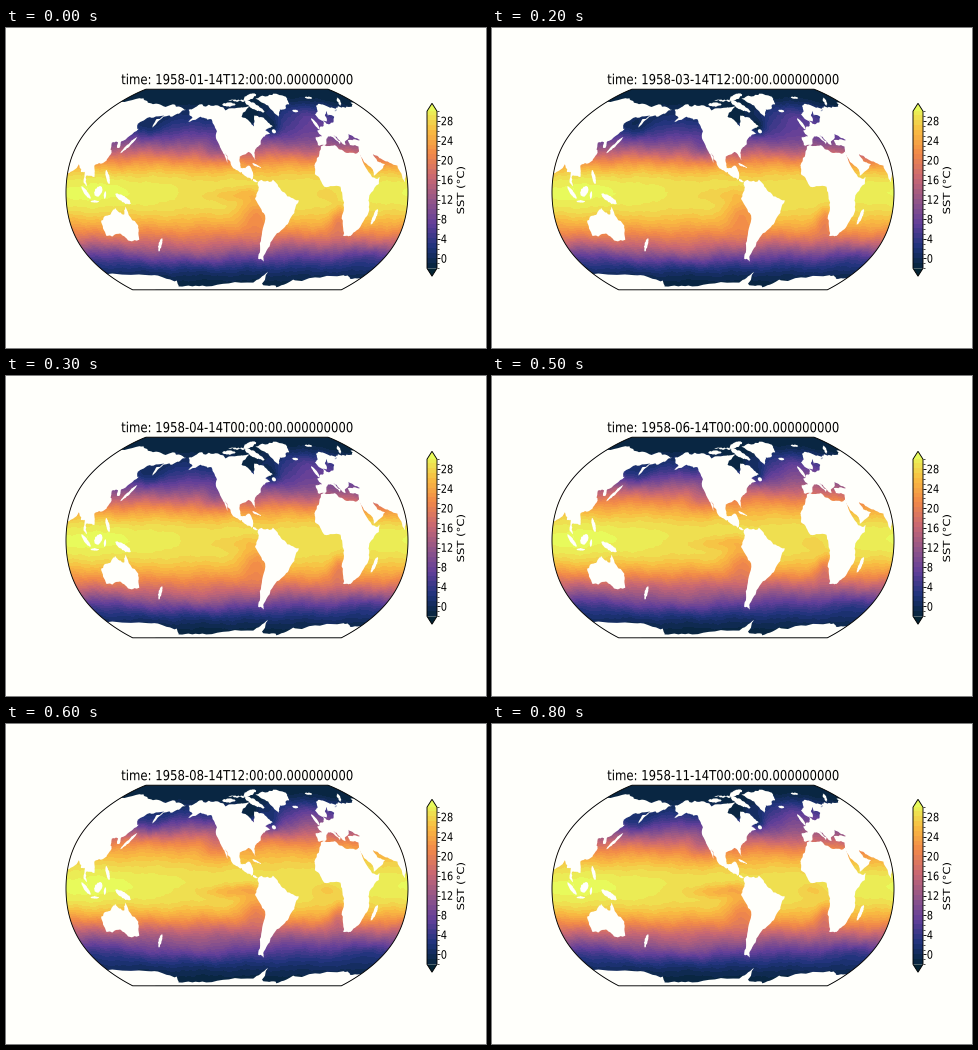
Recreate the animation shown at these times as a matplotlib script. Size 480 by 320 pixels, loop 0.9 s.

```python
import numpy as np
import matplotlib.pyplot as plt
from matplotlib.animation import FuncAnimation
from matplotlib.colors import BoundaryNorm, LinearSegmentedColormap
from matplotlib.patches import PathPatch, Polygon
from matplotlib.textpath import TextPath
from matplotlib.transforms import Affine2D

W, H = 480, 320
PAPER = "#fffffb"
TALL = 1.19                       # vertical scale of the whole picture
CX, CY, RX, RY = 231, 164.5, 171, 103.3
LON0, SOUTH = -100, -80.9
LEFT, RIGHT, TOP, BOTTOM = 60, 402, 61, 262

MONTHS = [0, 1, 2, 3, 4, 5, 7, 8, 10]
DAYS = [31, 28, 31, 30, 31, 30, 31, 31, 30, 31, 30, 31]

# a few capes and bays (lon, lat); roughen() fills in the coast between
EURASIA = [
    (-9, 37), (-9, 43), (-1, 44), (-4, 48.5), (8, 54), (10, 57), (12, 54),
    (21, 55), (28, 60), (21, 61), (24, 65), (17, 61), (14, 56), (6, 58),
    (5, 62), (15, 68), (28, 71), (41, 67), (35, 65), (45, 68), (68, 69),
    (75, 73), (104, 77), (130, 72), (160, 70), (190, 66), (178, 62),
    (163, 60), (157, 51), (156, 58), (163, 61), (143, 59), (136, 54),
    (141, 50), (128, 40), (129, 35), (126, 35), (125, 39), (118, 39),
    (122, 31), (119, 25), (107, 21), (109, 12), (100, 13), (103, 2), (98, 8),
    (98, 16), (94, 16), (90, 22), (80, 15), (77, 8), (72, 21), (57, 26),
    (49, 30), (52, 24), (59, 22), (45, 13), (35, 28), (36, 36), (27, 37),
    (27, 41), (41, 41), (31, 46), (28, 42), (23, 40), (22, 37), (13, 45),
    (18, 40), (16, 38), (9, 44), (3, 42), (-2, 37)]
AFRICA = [
    (-6, 36), (-17, 21), (-17, 14), (-8, 4.5), (9, 4.5), (13, -8), (12, -18),
    (18, -34), (26, -34), (35, -24), (40, -15), (39, -5), (51, 12), (43, 12),
    (35, 29), (36, 31), (20, 31), (10, 37)]
NORTH_AMERICA = [
    (-168, 66), (-156, 71), (-128, 70), (-95, 68), (-82, 69), (-94, 60),
    (-82, 54), (-79, 52), (-77, 61), (-65, 59), (-56, 52), (-66, 49),
    (-61, 46), (-70, 43), (-76, 36), (-81, 31), (-80, 25), (-84, 30),
    (-97, 28), (-96, 19), (-91, 19), (-87, 21), (-83, 15), (-83, 9), (-77, 8),
    (-85, 10), (-95, 16), (-106, 21), (-113, 31), (-110, 23), (-117, 33),
    (-124, 42), (-124, 48), (-135, 58), (-148, 60), (-163, 55), (-158, 59)]
SOUTH_AMERICA = [
    (-78, 8), (-62, 10), (-50, 0), (-35, -6), (-39, -16), (-48, -27),
    (-62, -39), (-68, -50), (-66, -55), (-74, -52), (-73, -38), (-70, -18),
    (-81, -5), (-77, 4)]
AUSTRALIA = [
    (114, -22), (122, -18), (131, -12), (140, -17), (142, -11), (153, -26),
    (150, -37), (140, -38), (131, -32), (115, -34)]
GREENLAND = [(-45, 60), (-54, 70), (-70, 77), (-35, 83), (-18, 79), (-22, 71),
             (-38, 66)]
ANTARCTICA = [
    (-320, -66), (-225, -66), (-190, -71), (-195, -77), (-150, -77),
    (-75, -73), (-58, -63), (-61, -74), (-35, -78), (-10, -71), (50, -66),
    (75, -69), (120, -66), (120, -90), (-320, -90)]
# islands as ovals: lon, lat, half length, half width, tilt
ISLES = [
    (-75, 69, 14, 3, -20), (-112, 71, 10, 2, 0), (-78, 79, 12, 3, 15),
    (-98, 75, 16, 1, 0), (18, 78, 6, 1.3, 0), (59, 74, 8, 1.2, 30),
    (-19, 65, 4, 1.2, 0), (-2, 54, 5, 2, 110), (138, 37, 9, 1.4, 45),
    (123, 12, 6, 1.6, -65), (114, 1, 5, 3.5, 40), (101, 0, 7, 1.6, -45),
    (110, -7, 4.5, .8, 0), (121, -2, 3, 1.2, 80), (140, -5, 9, 2.5, -25),
    (172, -41, 7, 1.4, 50), (47, -19, 6.5, 2, 70), (-79, 21, 5, .8, -20),
    (-56, 48, 2.5, 1.7, 0)]

# warm and cold patches of sea: lon, lat, half width, half height, degrees
PATCHES = [
    (110, 2, 70, 16, 1.6), (-80, -16, 18, 13, -5), (10, -22, 9, 10, -5),
    (-122, 30, 15, 11, -4), (-58, 52, 10, 8, -5), (0, 60, 38, 14, 5),
    (150, 50, 22, 9, -3.5), (-85, 60, 12, 8, -6), (-150, -47, 65, 10, 3),
    (70, -50, 40, 8, -2)]

THERMAL = ["#042333", "#20347c", "#613f9a", "#935689", "#ca6972", "#f28949",
           "#f9bc42", "#e8fa5b"]
LEVELS = np.arange(-2, 31)
cmap = LinearSegmentedColormap.from_list("thermal", THERMAL).resampled(34)
norm = BoundaryNorm(LEVELS, 34, extend="both")


def row_width(lat):
    """Robinson-like length of a parallel, as a share of the equator."""
    u = np.radians(lat) ** 2
    return 1 - .1276 * u - .072 * u ** 2 + .019 * u ** 3


def row_height(lat):
    a = np.radians(np.abs(lat))
    return np.sign(lat) * (.7106 * a - .00774 * a ** 6)


def project(lon, lat):
    x = CX + RX * row_width(lat) * (lon - LON0) / 180
    return np.column_stack([x, CY - RY * row_height(lat)])


def oval(lon, lat, length, width, tilt):
    a = np.linspace(0, 2 * np.pi, 10, endpoint=False)
    ring = np.column_stack([length * np.cos(a), width * np.sin(a)])
    return Affine2D().rotate_deg(tilt).translate(lon, lat).transform(ring)


def roughen(points, rng):
    """Split each edge in two and nudge the middle sideways."""
    p = np.array(points, float)
    step = np.roll(p, -1, axis=0) - p
    side = np.column_stack([-step[:, 1], step[:, 0]])
    push = rng.normal(0, .09, len(p)) * np.minimum(1, 8 / np.hypot(*step.T))
    mid = p + step / 2 + side * push[:, None]
    return np.stack([p, mid], axis=1).reshape(-1, 2)


def season(month, peak):
    return np.cos(2 * np.pi * (month - peak) / 12)


def bump(lon, lat, lon0, lat0, width, height):
    d = (lon - lon0 + 180) % 360 - 180
    return np.exp(-(d / width) ** 2 - ((lat - lat0) / height) ** 2)


def sea_temp(lon, lat, month):
    a = np.radians(lon)
    wavy = (lat + .8 * np.sin(5 * a + lat / 9) + .5 * np.sin(13 * a - lat / 5)
            + .35 * np.sin(31 * a + lat / 2 + month))
    away = np.abs(wavy)
    t = 31.3 * np.exp(-(away / 46) ** 2.6) - 2.5
    swing = np.where(wavy > 0, 4.5, -2.6) * np.exp(-((away - 37) / 17) ** 2)
    t += swing * season(month, 7.4)
    for *place, degrees in PATCHES:
        t += degrees * bump(lon, wavy, *place)
    # cool tongues along the equator, strongest in September
    tongue = 1 - .5 * season(month, 2.5)
    t -= 3 * tongue * bump(lon, wavy, -100, -2, 36, 5)
    t -= 1.6 * tongue * bump(lon, wavy, -5, -2, 16, 6)
    return np.clip(t, -1.9, 30.5)


def stamp(month):
    half = DAYS[month] / 2 - 1
    day, hour = int(half), int(half % 1 * 24)
    return f"time: 1958-{month + 1:02d}-{day:02d}T{hour:02d}:00:00.000000000"


def text_path(text, x, y, size, turn=0, center=True):
    path = TextPath((0, 0), text, size=size)
    box = path.get_extents()
    shift = -(box.x0 + box.x1) / 2 if center else 0
    move = Affine2D().translate(shift, 0).rotate_deg(turn)
    return move.scale(1, -TALL).translate(x, y).transform_path(path)


def add_text(*args, **kw):
    patch = PathPatch(text_path(*args, **kw), fc="black", lw=0, zorder=5)
    return ax.add_patch(patch)


def add_line_shape(points):
    return ax.add_patch(Polygon(points, fill=False, ec="black", lw=.65,
                                zorder=4))


def add_field(values, extent):
    return ax.imshow(values, cmap=cmap, norm=norm, aspect="auto",
                     extent=extent, interpolation="nearest")


fig = plt.figure(figsize=(W / 100, H / 100), dpi=100, facecolor=PAPER)
ax = fig.add_axes([0, 0, 1, 1])
ax.axis("off")

# sea, one value for each pixel
px, py = np.meshgrid(np.arange(LEFT, RIGHT) + .5, np.arange(TOP, BOTTOM) + .5)
rows = np.linspace(-90, 90, 361)
lat = np.interp((CY - py) / RY, row_height(rows), rows)
lon = LON0 + 180 * (px - CX) / (RX * row_width(lat))
sea = add_field(sea_temp(lon, lat, 0), (LEFT, RIGHT, BOTTOM, TOP))

# frame of the map
edge = np.linspace(SOUTH, 90, 120)
outline = add_line_shape(np.vstack([project(LON0 - 180, edge),
                                    project(LON0 + 180, edge[::-1])]))
sea.set_clip_path(outline)

# land, drawn twice so it wraps round the map's edge
rng = np.random.default_rng(4)
LANDS = [EURASIA, AFRICA, NORTH_AMERICA, SOUTH_AMERICA, AUSTRALIA, GREENLAND,
         ANTARCTICA] + [oval(*isle) for isle in ISLES]
for coast in LANDS:
    for _ in range(3):
        coast = roughen(coast, rng)
    for turn in (0, -360):
        patch = Polygon(project(coast[:, 0] + turn, coast[:, 1]), fc=PAPER,
                        lw=0, zorder=2)
        ax.add_patch(patch)
        patch.set_clip_path(outline)

# colour bar
BX0, BX1, BY0, BY1, TIP = 421, 431, 240.3, 83.2, 7.9
mid = (BX0 + BX1) / 2
low, high = (mid, BY0 + TIP), (mid, BY1 - TIP)
add_field((LEVELS[:-1] + .5)[::-1, None], (BX0, BX1, BY0, BY1))
for y, tip, color in ((BY0, low, cmap(0)), (BY1, high, cmap(33))):
    ax.add_patch(Polygon([(BX0, y), (BX1, y), tip], fc=color, lw=0))
add_line_shape([(BX0, BY0), low, (BX1, BY0), (BX1, BY1), high, (BX0, BY1)])
for value, y in zip(LEVELS, np.linspace(BY0, BY1, len(LEVELS))):
    major = value % 4 == 0
    ax.plot([BX1, BX1 + (3.2 if major else 1.9)], [y, y], color="black",
            lw=.65 if major else .5, solid_capstyle="butt")
    if major:
        add_text(str(value), 434.8, y + 4.2, 9.73, center=False)
add_text("SST (°C)", 458, 162.3, 9.73, turn=90)

TITLE = (CX, 56.2, 11.68)
title = add_text(stamp(0), *TITLE)

ax.set_xlim(0, W)
ax.set_ylim(H, 0)


def update(i):
    month = MONTHS[i]
    sea.set_data(sea_temp(lon, lat, month))
    title.set_path(text_path(stamp(month), *TITLE))
    return sea, title


anim = FuncAnimation(fig, update, frames=len(MONTHS), interval=100,
                     repeat=True, repeat_delay=0, blit=False)
plt.show()
```
